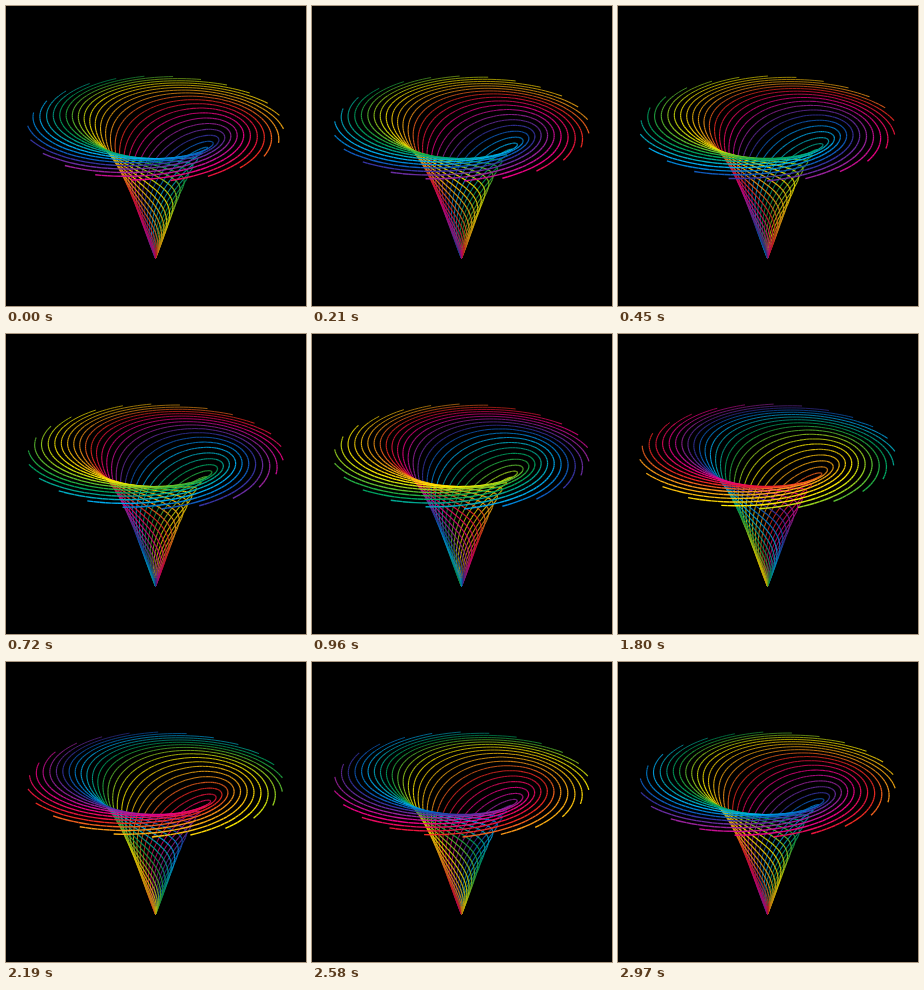
Animation, 300 px wide and 300 px high, one loop 3 s. Source, as an HTML page with a canvas:

```html
<!DOCTYPE html>
<html lang="en">
<head>
<meta charset="utf-8">
<title>Rainbow funnel</title>
<style>
  html, body { margin: 0; width: 100%; height: 100%; overflow: hidden; background: #000; }
  canvas { display: block; width: 300px; height: 300px; }
</style>
</head>
<body>
<canvas id="stage"></canvas>
<script>
const LOOP = 3000, STEP = 30;
const LINES = 24, SEGMENTS = 110;
const TURN = 2 * Math.PI, RAD = Math.PI / 180;
const START = 99.2 * RAD, HUE_START = 357;

// camera: distance, focal length, elevation and screen centre
const DIST = 6, FOCAL = 759, SIN = 0.405, COS = 0.914, CX = 149.5, CY = 114.5;
const DEPTH = 1.298;

// rainbow stops: angle around the rim, red, green, blue
const STOPS = [
  [0, 236, 0, 140], [30, 146, 39, 160], [58, 52, 54, 165], [78, 0, 110, 205],
  [103, 0, 174, 239], [153, 0, 166, 80], [218, 255, 242, 0],
  [283, 250, 150, 25], [316, 237, 28, 36], [360, 236, 0, 140]
];

function rainbow(deg) {
  const i = STOPS.findIndex(s => s[0] > deg);
  const a = STOPS[i - 1], b = STOPS[i];
  const k = (deg - a[0]) / (b[0] - a[0]);
  return [1, 2, 3].map(n => a[n] + (b[n] - a[n]) * k);
}

// the line winds once from rim to tip, faster in the cone
const sink = r => DEPTH * (1 - r) ** 5 * (1 + 2.7 * r);
const wind = r => TURN * (0.75 * (1 - r) + 0.25 * (1 - r) ** 3);

function project(r, angle) {
  const across = r * Math.cos(angle), toward = r * Math.sin(angle), h = sink(r);
  const near = toward * COS - h * SIN;
  const scale = FOCAL / (DIST - near);
  return { x: CX + across * scale, y: CY + (toward * SIN + h * COS) * scale, near };
}

const canvas = document.getElementById('stage');
const ctx = canvas.getContext('2d');
const ratio = window.devicePixelRatio || 1;
canvas.width = canvas.height = 300 * ratio;
ctx.scale(ratio, ratio);

const lines = Array.from({ length: LINES }, (_, i) => {
  const deg = i * 360 / LINES;
  return { angle: START + deg * RAD, color: rainbow((deg + HUE_START) % 360) };
});

// far parts are darker and thinner
function shade(color, near) {
  const light = Math.min(1, 0.88 + 0.25 * near);
  return `rgb(${color.map(c => Math.round(c * light))})`;
}

function draw(turn) {
  ctx.fillStyle = '#000';
  ctx.fillRect(0, 0, 300, 300);
  const pieces = [];
  for (const { angle, color } of lines) {
    let from = project(1, angle - turn);
    for (let j = 1; j <= SEGMENTS; j++) {
      const r = 1 - j / SEGMENTS;
      const to = project(r, angle - turn - wind(r));
      pieces.push({ from, to, color });
      from = to;
    }
  }
  pieces.sort((a, b) => a.from.near - b.from.near);
  for (const { from, to, color } of pieces) {
    ctx.strokeStyle = shade(color, from.near);
    ctx.lineWidth = 1.15 + 0.3 * from.near;
    ctx.beginPath();
    ctx.moveTo(from.x, from.y);
    ctx.lineTo(to.x, to.y);
    ctx.stroke();
  }
}

const begin = performance.now();
let shown = -1;
function tick() {
  const time = Math.max(0, performance.now() - begin) % LOOP;
  const step = Math.floor(time / STEP);
  if (step !== shown) {
    shown = step;
    draw(step * STEP / LOOP * TURN);
  }
  requestAnimationFrame(tick);
}
tick();
</script>
</body>
</html>
```
